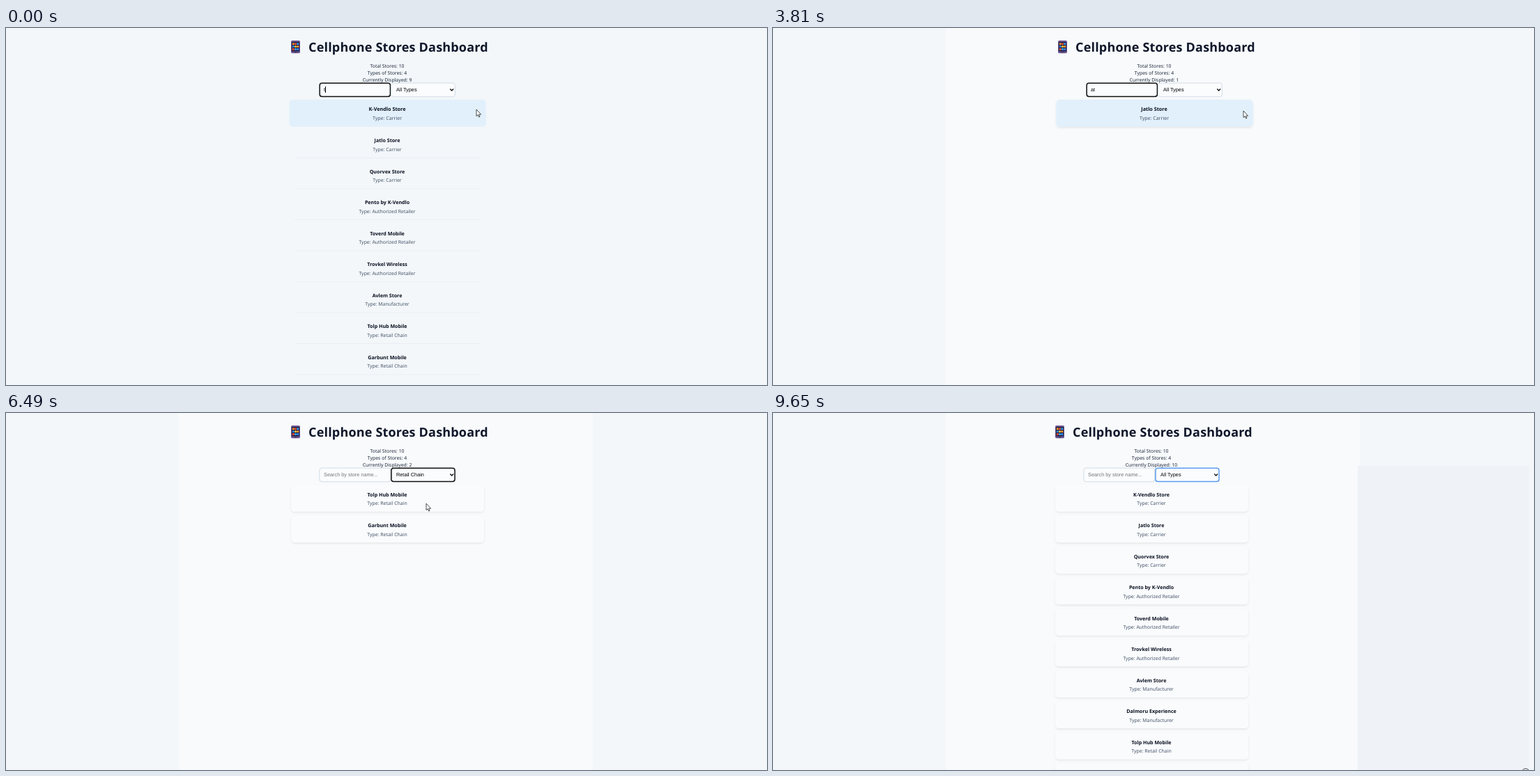
Recreate the animation shown at these times as an HTML page. Size 1092 px wide and 513 px high, loop 9670 ms.

```html
<!DOCTYPE html>
<html lang="en">
<head>
<meta charset="utf-8">
<title>Cellphone Stores Dashboard</title>
<style>
  html, body { margin: 0; width: 100%; height: 100%; overflow: hidden; background: #f3f7fa; }
  svg { display: block; width: 100vw; height: 100vh; }
  text { font-family: "Noto Sans", "Open Sans", sans-serif; text-rendering: geometricPrecision; white-space: pre; }
  .title { font-size: 18px; font-weight: 700; letter-spacing: .18px; fill: #0f172a; }
  .stat { font-size: 6.85px; fill: #1e293b; text-anchor: middle; }
  .name { font-size: 7.1px; font-weight: 700; fill: #0a1020; text-anchor: middle; }
  .type { font-size: 6.9px; fill: #475569; text-anchor: middle; }
  .ui { font: 7.33px "Liberation Sans", Arial, sans-serif; fill: #000; }
  .hint { fill: #757575; }
  .box { fill: #fafcfd; stroke: #d3dce6; stroke-width: 1; }
  .focus { stroke: #101010; stroke-width: 1.5; }
  .blue { stroke: #5c9df2; stroke-width: 1.5; }
</style>
</head>
<body>
<svg viewBox="0 0 1092 513">
  <defs>
    <filter id="soft" x="-5%" y="-20%" width="110%" height="150%">
      <feDropShadow dx="0" dy="1.6" stdDeviation="1.6" flood-color="#0f172a" flood-opacity=".08"/>
    </filter>
    <filter id="blur" x="-40%" y="-40%" width="180%" height="180%">
      <feGaussianBlur stdDeviation="5"/>
    </filter>
  </defs>
  <g id="back"></g>
  <g id="page"></g>
  <g id="pointer"></g>
</svg>
<script>
const LOOP = 9670;
const TYPES = ['All Types', 'Carrier', 'Authorized Retailer', 'Manufacturer', 'Retail Chain'];
const STORES = [
  ['K-Vendlo Store', 1], ['Jatlo Store', 1], ['Quorvex Store', 1],
  ['Pento by K-Vendlo', 2], ['Toverd Mobile', 2], ['Trovkel Wireless', 2],
  ['Avlem Store', 3], ['Dalmoru Experience', 3],
  ['Tolp Hub Mobile', 4], ['Garbunt Mobile', 4]
];
const DOTS = ['#ff9d2e', '#2f8df0', '#f0503c', '#ffc83d', '#35a4f5'];

// Each step changes part of the state and holds until the next one.
const STEPS = [
  [0, { q: 't', caret: 1, type: 0, open: 0, hi: 0, field: 'focus', select: '', hover: 1, cards: 0, light: 0, edge: 0, click: 0, at: [675, 117] }],
  [250, { at: [675, 119] }],
  [500, { caret: 0 }],
  [1030, { q: 'a', caret: 1 }],
  [1650, { caret: 0 }],
  [2020, { q: '', caret: 1, light: 1, cards: 2 }],
  [2140, { caret: 0 }],
  [2760, { q: 'as', caret: 1 }],
  [3160, { q: 'a', hover: 0, cards: 4 }],
  [3310, { q: 'at', hover: 1 }],
  [3810, { caret: 0 }],
  [4060, { q: 'a', caret: 1 }],
  [4310, { q: '', cards: 2 }],
  [4460, { caret: 0 }],
  [4860, { hover: .8, at: [685, 62] }],
  [4980, { hover: .35, at: [672, 66] }],
  [5100, { hover: 0, at: [646, 74] }],
  [5220, { at: [624, 82] }],
  [5370, { at: [615, 84], field: '', select: 'blue', click: 1 }],
  [5490, { open: 1, hi: 0 }],
  [5610, { click: 0, at: [613, 90] }],
  [5760, { hi: 2, at: [604, 130] }],
  [5880, { hi: 4, at: [597, 157] }],
  [6250, { click: 1 }],
  [6370, { type: 4, open: 0, select: 'focus', cards: 10 }],
  [6490, { click: 0, at: [603, 130] }],
  [6610, { at: [610, 90] }],
  [6860, { click: 1, open: 1, hi: 4, select: 'blue' }],
  [6980, { click: 0, at: [606, 108], hi: 0 }],
  [7100, { at: [601, 125], hi: 1 }],
  [7350, { type: 1, open: 0, select: 'focus', at: [601, 127] }],
  [7470, { hover: 1 }],
  [7620, { hover: .5, at: [609, 108] }],
  [7740, { hover: 0, at: [613, 97] }],
  [7890, { at: [615, 82], click: 1, open: 1, hi: 1, select: 'blue' }],
  [8130, { click: 0, at: [612, 94] }],
  [8250, { at: [608, 106], hi: 0 }],
  [8370, { click: 1 }],
  [8490, { click: 0, type: 0, open: 0, hover: .7, at: [610, 113] }],
  [8640, { hover: .4, at: [690, 190] }],
  [8760, { hover: 0, at: [830, 320] }],
  [8880, { at: [970, 440] }],
  [9000, { at: [1058, 502] }],
  [9650, { at: [1080, 517], click: 1, edge: 1 }]
];

const text = (cls, x, y, s, more = '') => `<text class="${cls}" x="${x}" y="${y}" ${more}>${s}</text>`;
const rect = (x, y, w, h, more) => `<rect x="${x}" y="${y}" width="${w}" height="${h}" ${more}/>`;
const get = id => document.getElementById(id);

const measure = document.createElement('canvas').getContext('2d');
measure.font = '73.3px "Liberation Sans", Arial, sans-serif';
const widthOf = s => measure.measureText(s).width / 10;

function phone() {
  let out = rect(409, 18, 13, 18.3, 'rx="1.8" fill="#6a5590"') +
    rect(410.2, 20.2, 10.6, 13.2, 'fill="#1a1a3a"');
  for (let i = 0; i < 9; i++) {
    out += rect(410.9 + i % 3 * 3.2, 21.4 + Math.floor(i / 3) * 3.8, 2.8, 2.9,
      `rx=".7" fill="${DOTS[i * 2 % 5]}"`);
  }
  return out + rect(413.7, 34.4, 3.6, .9, 'rx=".4" fill="#2b2342"');
}

function row([name, type], i, s) {
  const y = 103.5 + i * 44.5;
  const hover = i ? 0 : s.hover;
  const k = 1 + .02 * hover;
  let out = '';
  if (i < s.cards) out += rect(409, y, 277, 38, 'rx="5" fill="#f9fbfd" filter="url(#soft)"');
  else if (!hover) out += rect(414, y + 38, 267, 1, 'fill="#eaeff4"');
  if (hover) out += rect(409, y, 277, 38, `rx="5" fill="#e2f0fb" opacity="${hover}"`);
  out += text('name', 547, y + 16, name) + text('type', 547, y + 28.7, 'Type: ' + TYPES[type]);
  return `<g transform="translate(547 ${y + 19}) scale(${k}) translate(-547 ${-y - 19})">${out}</g>`;
}

function controls(s) {
  const frame = (x, w, cls) => {
    const d = cls ? .75 : .5;
    return rect(x + d, 78.5 + d, w - 2 * d, 20.8 - 2 * d, `rx="3.2" class="box ${cls}"`);
  };
  let out = frame(449.4, 102.8, s.field) + frame(552.2, 92.6, s.select);
  out += s.q ? text('ui', 456, 91.4, s.q) : text('ui hint', 456, 91.4, 'Search by store name...');
  if (s.caret) out += rect(Math.floor(456 + widthOf(s.q)), 84, 1, 9, 'fill="#000"');
  return out + text('ui', 560, 91.4, TYPES[s.type]) +
    '<path d="M637.3 87.6l2.4 2.5 2.4-2.5" fill="none" stroke="#111" stroke-width="1.4"/>';
}

function menu(s) {
  let out = rect(550, 108, 100, 78, 'rx="8" fill="#000" opacity=".17" filter="url(#blur)"') +
    rect(552.5, 99.5, 91.5, 69.5, 'rx="1" fill="#fff" stroke="#8b8f94"');
  TYPES.forEach((label, i) => {
    const y = 100 + i * 13.8;
    const on = i === s.hi;
    if (on) out += rect(553, y, 90.5, 13.8, 'fill="#1967d2"');
    out += text('ui', 560, y + 9.6, label, on ? 'style="fill:#fff"' : '');
  });
  return out;
}

function draw(s) {
  const shown = STORES.filter(([name, type]) =>
    name.toLowerCase().includes(s.q) && (!s.type || type === s.type));
  // A full list brings a scrollbar, which nudges the centred page left.
  const dx = shown.length > 9 ? -4 : 0;

  get('back').innerHTML =
    (s.light ? rect(248, 0, 594, 513, 'fill="#f8fafc"') : '') +
    (s.edge ? rect(839, 76, 246, 437, 'fill="#eff3f8"') : '');

  get('page').setAttribute('transform', `translate(${dx} 0)`);
  get('page').innerHTML = phone() +
    text('title', 434, 33.5, 'Cellphone Stores Dashboard') +
    controls(s) +
    text('stat', 547, 57.2, 'Total Stores: ' + STORES.length) +
    text('stat', 547, 67, 'Types of Stores: ' + (TYPES.length - 1)) +
    text('stat', 547, 76.7, 'Currently Displayed: ' + shown.length) +
    shown.map((store, i) => row(store, i, s)).join('') +
    (s.open ? menu(s) : '');

  get('pointer').setAttribute('transform', `translate(${s.at})`);
  get('pointer').innerHTML =
    (s.click ? '<circle r="6" fill="none" stroke="#333" stroke-width=".9"/>' : '') +
    '<path d="M0 0V9.6L2.1 7.7 3.6 11 5 10.4 3.6 7.2H6.6Z" fill="#fff" stroke="#222" stroke-width=".8"/>';
}

let state = {};
const states = STEPS.map(([, change]) => state = { ...state, ...change });
let last = -1;

function tick() {
  const t = performance.now() % LOOP;
  let i = STEPS.length - 1;
  while (STEPS[i][0] > t) i--;
  if (i !== last) draw(states[last = i]);
  requestAnimationFrame(tick);
}
tick();
</script>
</body>
</html>
```
